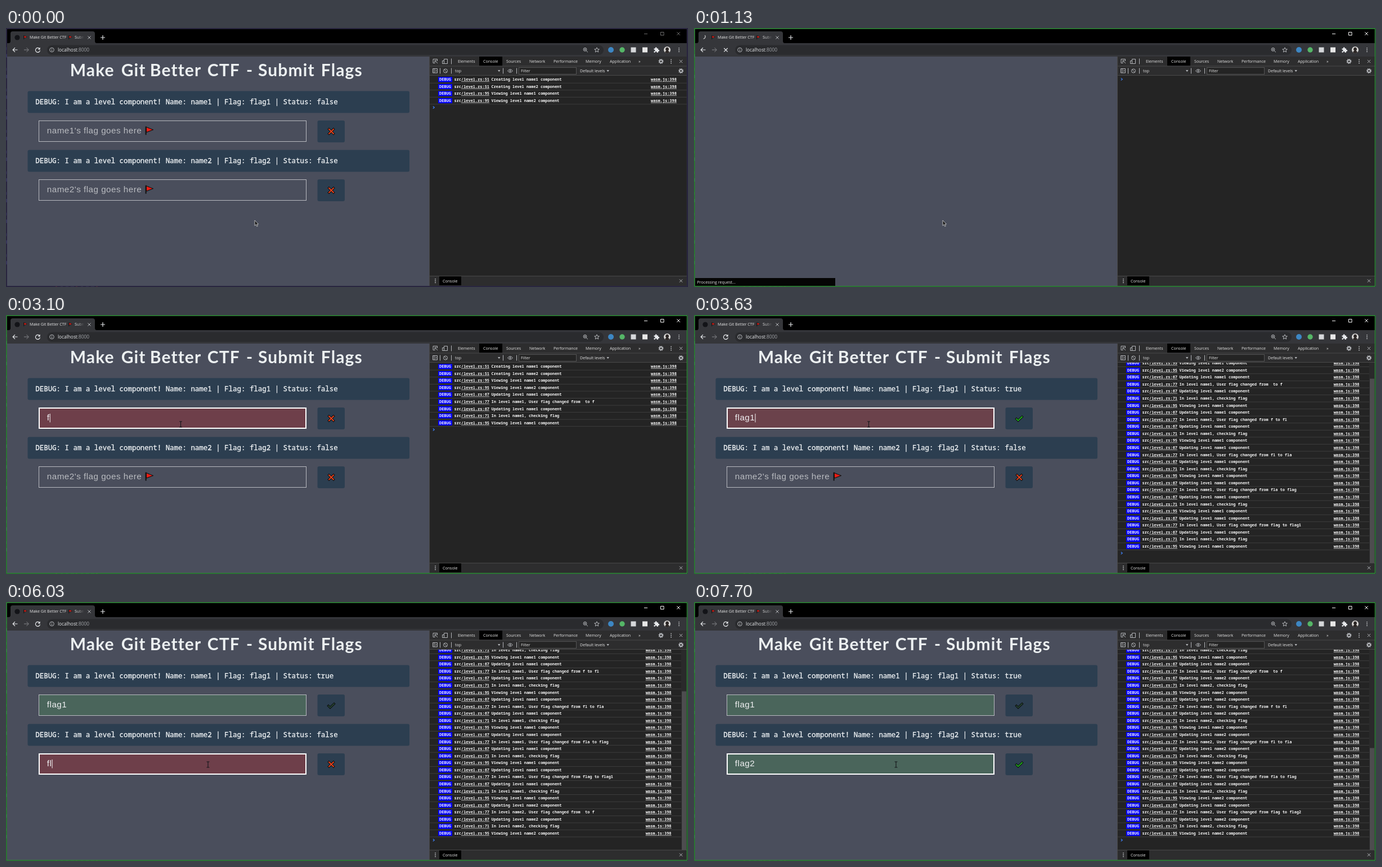
An HTML page that plays this animation: 1212x462 px, repeating every 8 s.

```html
<!DOCTYPE html>
<html lang="en">
<head>
<meta charset="utf-8">
<title>Submit Flags</title>
<style>
  html, body { margin: 0; width: 100%; height: 100%; overflow: hidden; background: #000; }
  svg { display: block; width: 1212px; height: 462px; }
  text { font: 7.1px "Open Sans", "Noto Sans", sans-serif; fill: #e4e4e4; white-space: pre; }
  .url { font-size: 8.3px; fill: #e8eaed; }
  .title { font: 700 30px Lato, "Open Sans", sans-serif; letter-spacing: 1.1px; fill: #ecf0f1; }
  .card { font: 12.44px "Noto Sans Mono", "DejaVu Sans Mono", monospace; fill: #f2f5f7; stroke: #f2f5f7; stroke-width: .3px; }
  .field { font: 15.2px "Liberation Sans", Arial, sans-serif; letter-spacing: .5px; fill: #f0f0f2; }
  .hint { fill: #babcc1; }
  .log text { font: 700 6.95px "Noto Sans Mono", "DejaVu Sans Mono", monospace; fill: #f4f4f4; }
  .log .u { text-decoration: underline; }
  .icon { fill: none; stroke: #b4b6ba; stroke-width: 1; }
  .lit { stroke: #e8eaed; stroke-width: 1.2; }
</style>
</head>
<body>
<svg viewBox="0 0 1212 462">
  <defs>
    <g id="flag">
      <path d="M2 1.5 14.5 6.5 2.5 11Z" fill="#f01c14" stroke="#111" stroke-width="1.1" stroke-linejoin="round"/>
      <path d="M1.6.6V15.6" stroke="#111" stroke-width="2"/>
    </g>
    <g id="dots" fill="#c4c6ca"><circle cy="-3.2" r=".9"/><circle r=".9"/><circle cy="3.2" r=".9"/></g>
    <path id="cross" d="M-2.6-2.6 2.6 2.6M2.6-2.6-2.6 2.6" class="icon"/>
    <g id="gear" class="icon"><circle r="2.5" stroke-width="1.8"/><circle r="3.9" stroke-width="1.3" stroke-dasharray="1.5 1.56"/></g>
    <clipPath id="logClip"><path d="M753 85h457v357H753z"/></clipPath>
    <clipPath id="tabClip"><path d="M30 8h109v18H30z"/></clipPath>
    <linearGradient id="fade"><stop stop-color="#35363a" stop-opacity="0"/><stop offset="1" stop-color="#35363a"/></linearGradient>
  </defs>

  <rect width="1212" height="462" fill="#26233a"/>
  <g id="behind"></g>
  <rect x="2" y="2" width="1208" height="458"/>

  <!-- tab strip -->
  <path d="M5 27q3 0 3-4V10q0-4 4-4h142q4 0 4 4v13q0 4 3 4z" fill="#35363a"/>
  <circle id="favicon" cx="20" cy="17" r="4.6" fill="#131418"/>
  <path id="spinner" d="M0-4A4 4 0 0 1-3.6 1.8" class="icon" style="stroke:#eee"/>
  <g clip-path="url(#tabClip)">
    <use href="#flag" transform="translate(31 13) scale(.46)"/>
    <text x="42" y="19.4">Make Git Better CTF</text>
    <use href="#flag" transform="translate(111 13) scale(.46)"/>
    <text x="122" y="19.4">Submit Flags</text>
    <rect x="126" y="8" width="13" height="18" fill="url(#fade)"/>
  </g>
  <use href="#cross" x="148" y="17"/>
  <path d="M168 17h8M172 13v8" class="icon lit"/>
  <path id="controls" d="M1134 10.5h6M1163.500 7.500h5.500v5.500h-5.500zM1192.300 7.300l5.500 5.500M1197.800 7.300l-5.500 5.500" class="icon" style="stroke:#fff"/>

  <!-- toolbar -->
  <path d="M2 27h1208v24H2z" fill="#35363a"/>
  <rect x="73" y="30.500" width="989" height="17.500" rx="8.700" fill="#2a2b2e"/>
  <path d="M20.500 39h-8M16 35.200 12.200 39 16 42.800" class="icon lit"/>
  <path d="M32 39h8M36.500 35.200 40.300 39 36.500 42.800" class="icon" style="stroke:#85878b"/>
  <g id="reload"><path d="M59.300 36.600A4 4 0 1 0 60.400 40" class="icon lit"/><path d="M60.600 34.500v4h-4z" fill="#e8eaed"/></g>
  <path id="stop" d="M53.300 36l6.400 6.400M59.700 36l-6.400 6.400" class="icon lit"/>
  <g class="icon"><circle cx="81.500" cy="39" r="3.800"/><path d="M81.500 38.500v2.800M81.500 36.400v1"/></g>
  <text class="url" x="92" y="42">localhost<tspan fill="#a0a3a8">:8000</tspan></text>
  <g class="icon">
    <circle cx="1029" cy="38.300" r="2.900"/><path d="M1031.200 40.500l2.800 2.800M1027.500 38.300h3M1029 36.800v3"/>
    <path d="M1050 34.800l1.200 2.900 3.100.2-2.400 2 .8 3.100-2.700-1.700-2.700 1.700.8-3.100-2.400-2 3.100-.2z"/>
  </g>
  <circle cx="1075" cy="39" r="5" fill="#3d87c4"/>
  <circle cx="1095" cy="39" r="4.700" fill="#55b667"/>
  <rect x="1110.500" y="34.500" width="9" height="9" fill="#d5d7da"/>
  <rect x="1131" y="34.500" width="9" height="9" fill="#e6e6e6"/>
  <path d="M1151.500 36.500h2.300a1.500 1.500 0 1 1 2.700 0h2.500v2.400a1.500 1.500 0 1 1 0 2.700v2.200h-2.700a1.400 1.400 0 1 0-2.500 0h-2.300v-2.500a1.400 1.400 0 1 0 0-2.500z" fill="#e8eaed"/>
  <circle cx="1175" cy="39" r="6" fill="#d9d7d5"/>
  <path d="M1171 43.500q.5-2.500 2.500-2.800a3 3.300 0 1 1 3 0q2 .3 2.500 2.800-4 3-8 0z" fill="#2b2625"/>
  <use href="#dots" x="1196" y="39"/>

  <!-- page -->
  <path d="M2 51h751v409H2z" fill="#4a4e5c"/>
  <g id="page">
    <text class="title" y="86"><tspan x="113.800">Make</tspan><tspan x="204.700">Git</tspan><tspan x="255.800">Better</tspan><tspan x="357.800">CTF</tspan><tspan x="427">-</tspan><tspan x="448">Submit</tspan><tspan x="559.800">Flags</tspan></text>
  </g>
  <g id="status"><path d="M2 446h249v14H2z" fill="#050505"/><text x="5.500" y="455.600">Processing request...</text></g>

  <!-- devtools -->
  <path d="M753 51h457v409H753z" fill="#242424"/>
  <path d="M753 51h457v34H753zM753 442h457v18H753z" fill="#2d2d2e"/>
  <path d="M841 51h41v16.500h-41zM770 443h39v16h-39z"/>
  <path d="M753 68h457M753 84.500h457M753 442.500h457M752.500 51v409" class="icon" style="stroke:#484848"/>
  <rect x="911.500" y="70.500" width="102" height="12" fill="#242424" stroke="#555"/>
  <g id="tabs"></g>
  <g class="icon">
    <path d="M766.500 59v-3.500h-7.500v7h3.500M762 58l5 5M762 61.500V58h3.500M778.500 55.500h6v8h-6zM775.500 58.500h3M775.500 58.500v5h3M791.500 54.500v10"/>
    <path d="M758.500 72.500h8v7.500h-8zM761 72.500v7.500M763 74.500l2 1.800-2 1.800M771.500 71.500v10M791.500 71.500v10M883.500 71.500v10M907.500 71.500v10"/>
    <circle cx="781" cy="76.500" r="3.500"/><path d="M778.600 74l4.900 5"/>
    <path d="M891.500 76.500q4.500-5.500 9 0-4.500 5.500-9 0z"/><circle cx="896" cy="76.500" r="1.200"/>
  </g>
  <path d="M874 75h4.400l-2.200 3.200zM1067.500 75h4.400l-2.200 3.200z" fill="#b4b6ba"/>
  <use href="#gear" x="1164" y="59.500"/><use href="#dots" x="1182" y="59.500"/><use href="#cross" x="1199.500" y="59.500"/>
  <use href="#gear" x="1199.500" y="76.500"/><use href="#dots" x="763" y="451"/><use href="#cross" x="1199.500" y="451"/>
  <g class="log" clip-path="url(#logClip)">
    <g id="rows"></g>
    <g id="links"></g>
    <path id="prompt" d="M758.800-2.200l2.500 2-2.500 2" fill="none" stroke="#3f7ff0" stroke-width="1.200"/>
    <g id="bar"><path d="M1200 85h10v357h-10z" fill="#2a2a2b"/><rect id="thumb" x="1201" width="8" fill="#4d4d4f"/></g>
  </g>

  <rect id="frame" x="1" y="1" width="1209.500" height="459.800" fill="none" stroke-width="1.500"/>
  <path id="arrow" d="M0 0v9.500l2.200-2 1.600 3.500 1.600-.8-1.600-3.300H6.600z" fill="#1c1c1c" stroke="#d8d8d8" stroke-width=".8"/>
  <path id="beam" d="M-2.500-5h2l.5.5.5-.5h2M0-4.500v9M-2.500 5h2l.5-.5.5.5h2" fill="none" stroke="#14161a" stroke-width="1.100"/>
</svg>
<script>
const LOOP = 8000, ROW = 12.57, BLINK = 560;
const RED = [110, 63, 74], GREEN = [74, 101, 91], PAGE = [74, 78, 92];
const TICK = [31, 184, 26], TICK_LIT = [10, 220, 12], TICK_DIM = [38, 72, 52];
const RELOAD = { start: 410, clear: 450, show: 520, blank: 1110, ready: 1170, end: 1210 };

// each key: time it is typed, time the app reacts
const fields = [
  { name: 1, focus: 1950, blur: 4910, glow: 4140,
    keys: [[3020, 3070], [3220, 3250], [3300, 3330], [3400, 3430], [3580, 3620]] },
  { name: 2, focus: 4910, blur: Infinity, glow: Infinity,
    keys: [[5700, 5700], [6030, 6060], [6210, 6260], [6580, 6580], [7140, 7180]] }
];
const path = [[0, 442, 343], [1270, 442, 343], [1590, 302, 213], [1900, 310.5, 195],
  [4150, 310.5, 195], [4550, 357, 306], [4900, 359, 290], [LOOP, 359, 290]];

const $ = id => document.getElementById(id);
const make = (tag, attrs, parent, text) => {
  const node = document.createElementNS('http://www.w3.org/2000/svg', tag);
  for (const k in attrs) node.setAttribute(k, attrs[k]);
  if (text) node.textContent = text;
  return parent.appendChild(node);
};
const set = (node, k, v) => node.setAttribute(k, v);
const show = (node, on) => { node.style.display = on ? '' : 'none'; };
const write = (node, s) => { if (node.textContent !== s) node.textContent = s; };
const ramp = (t, start, ms) => Math.min(1, Math.max(0, (t - start) / ms));
const soft = p => p * p * (3 - 2 * p);
const easeOut = (t, start, ms) => 1 - (1 - ramp(t, start, ms)) ** 2.2;
const mix = (a, b, p) => `rgb(${a.map((v, i) => Math.round(v + (b[i] - v) * p))})`;

// slivers of the window behind
for (let i = 0; i < 34; i++)
  make('rect', { x: 0, y: 22 + i * 12.3, width: i * 7 % 3, height: 4 + i % 3, fill: '#5c63a8' }, $('behind'));
for (let i = 0; i < 9; i++)
  make('rect', { x: 88 + i * 9, y: 460, width: 3 + i % 4, height: 1.5, fill: i % 4 ? '#5c5a78' : '#b0533c' }, $('behind'));

[['Elements', 803], ['Console', 848], ['Sources', 889], ['Network', 930], ['Performance', 973],
  ['Memory', 1030], ['Application', 1073], ['»', 1124], ['top', 798, 79], ['Filter', 915, 79.3],
  ['Default levels', 1020, 79], ['Console', 776, 453.6]
].forEach(([s, x, y = 62]) => make('text', { x, y }, $('tabs'), s));

for (const [i, f] of fields.entries()) {
  const g = make('g', { transform: `translate(0 ${i * 105})` }, $('page'));
  make('rect', { x: 38.5, y: 112.5, width: 678.5, height: 39, rx: 3, fill: '#2c3e50' }, g);
  f.card = make('text', { class: 'card', x: 52.3, y: 136.4 }, g);
  f.box = make('rect', { x: 58.5, y: 165.5, width: 475, height: 37, stroke: '#b8bac0' }, g);
  f.ring = make('rect', { x: 59, y: 166, width: 474, height: 36, fill: 'none', stroke: '#fff', 'stroke-width': 2 }, g);
  f.hint = make('g', {}, g);
  make('text', { class: 'field hint', x: 72.8, y: 188.2 }, f.hint, `name${f.name}'s flag goes here`);
  make('use', { href: '#flag', x: 247, y: 175 }, f.hint);
  f.text = make('text', { class: 'field', x: 72.8, y: 188.2 }, g);
  f.caret = make('rect', { y: 176, width: 1, height: 15.5, fill: '#f4f4f4' }, g);
  make('rect', { x: 553.5, y: 165, width: 48.5, height: 39, rx: 3, fill: '#2c3e50' }, g);
  const mark = (d, stroke) => {
    const m = make('g', { fill: 'none', 'stroke-linecap': 'square' }, g);
    make('path', { d, stroke: '#0c0c0c', 'stroke-width': 3.8 }, m);
    m.ink = make('path', { d, stroke, 'stroke-width': 1.8 }, m);
    return m;
  };
  f.no = mark('M574 180.500l8 8M582 180.500l-8 8', '#f2441d');
  f.yes = mark('M573 185.300l3 3 7-6.700', '#1fb81a');
  f.done = f.keys[4][1];
}

const log = [[51, 'Creating level name1 component'], [51, 'Creating level name2 component'],
  [95, 'Viewing level name1 component'], [95, 'Viewing level name2 component']];
for (const f of fields) {
  const word = 'flag' + f.name, who = 'level name' + f.name;
  f.keys.forEach((_, k) => log.push(
    [67, `Updating ${who} component`],
    [77, `In ${who}, User flag changed from ${word.slice(0, k)} to ${word.slice(0, k + 1)}`],
    [67, `Updating ${who} component`],
    [71, `In ${who}, checking flag`],
    [95, `Viewing ${who} component`]));
}
const lines = log.map(([num, msg], i) => {
  const y = 94.2 + i * ROW;
  const row = make('g', {}, $('rows'));
  make('rect', { x: 768, y: y - 6.9, width: 25, height: 9.2, fill: '#0000ff' }, row);
  make('text', { x: 770, y }, row, 'DEBUG');
  const src = make('text', { x: 796.5, y }, row, 'src');
  make('tspan', { class: 'u' }, src, `/level.rs:${num}`);
  make('text', { x: 862.5, y }, row, msg);
  make('rect', { x: 753, y: y + 3.6, width: 457, height: .8, fill: '#434343' }, row);
  const link = make('text', { class: 'u', x: 1146, y }, $('links'), 'wasm.js:398');
  return [row, link];
});

function drawField(f, t) {
  const typed = f.keys.filter(k => t >= k[0]);
  const solved = t >= f.done;
  const focused = t >= f.focus && t < f.blur;
  write(f.card, `DEBUG: I am a level component! Name: name${f.name} | Flag: flag${f.name} | Status: ${solved}`);
  write(f.text, ('flag' + f.name).slice(0, typed.length));
  show(f.hint, !typed.length);
  set(f.box, 'fill', solved ? mix(RED, GREEN, ramp(t, f.done, 140)) : mix(PAGE, RED, easeOut(t, f.focus, 520)));
  set(f.ring, 'opacity', easeOut(t, f.focus, 520) * (1 - easeOut(t, f.blur, 520)));

  const last = typed.length ? typed[typed.length - 1][0] : f.focus;
  show(f.caret, focused && (t - last) % (2 * BLINK) < BLINK);
  set(f.caret, 'x', 73 + (typed.length ? f.text.getComputedTextLength() : 0));

  show(f.no, !solved);
  show(f.yes, solved);
  set(f.yes.ink, 'stroke', t < f.blur
    ? mix(TICK, TICK_LIT, ramp(t, f.glow, 360))
    : mix(TICK_LIT, TICK_DIM, ramp(t, f.blur, 520)));
}

function drawLog(t) {
  let n = t >= RELOAD.clear && t < RELOAD.ready ? 0 : 4;
  for (const f of fields) n += 5 * f.keys.filter(k => t >= k[1]).length;
  lines.forEach((pair, i) => pair.forEach(node => show(node, i < n)));
  const end = 91.6 + n * ROW, scroll = Math.max(0, end - 425), total = 357 + scroll;
  set($('rows'), 'transform', `translate(0 ${-scroll})`);
  set($('links'), 'transform', `translate(${scroll ? -9.3 : 0} ${-scroll})`);
  set($('prompt'), 'transform', `translate(0 ${end - scroll})`);
  show($('bar'), scroll > 0);
  set($('thumb'), 'y', 85 + 357 * scroll / total);
  set($('thumb'), 'height', 357 * 357 / total);
}

function drawPointer(t) {
  const i = path.findIndex(p => p[0] > t);
  const [a, b] = [path[i - 1], path[i]], p = soft(ramp(t, a[0], b[0] - a[0]));
  const x = a[1] + (b[1] - a[1]) * p, y = a[2] + (b[2] - a[2]) * p;
  const inField = x > 58 && x < 534 && ((y > 165 && y < 203) || (y > 270 && y < 308));
  for (const id of ['arrow', 'beam']) set($(id), 'transform', `translate(${x} ${y})`);
  show($('arrow'), !inField);
  show($('beam'), inField);
}

function draw(t) {
  const active = t >= 150, loading = t >= RELOAD.start && t < RELOAD.end;
  set($('frame'), 'stroke', active ? '#2f8f33' : '#2b2742');
  set($('behind'), 'opacity', active ? .45 : 1);
  set($('controls'), 'opacity', active ? 1 : .42);
  show($('favicon'), !loading);
  show($('spinner'), loading);
  set($('spinner'), 'transform', `translate(20 17) rotate(${(t - 700) * .4 + 180})`);
  show($('reload'), !loading);
  show($('stop'), loading);
  set($('status'), 'opacity', t < RELOAD.show ? 0 : 1 - ramp(t, 1260, 140));
  set($('page'), 'opacity', t < RELOAD.blank ? 1 : easeOut(t, RELOAD.ready, 1000));
  fields.forEach(f => drawField(f, t));
  drawLog(t);
  drawPointer(t);
}

const begin = performance.now();
function tick() {
  draw((performance.now() - begin) % LOOP);
  requestAnimationFrame(tick);
}
tick();
</script>
</body>
</html>
```
